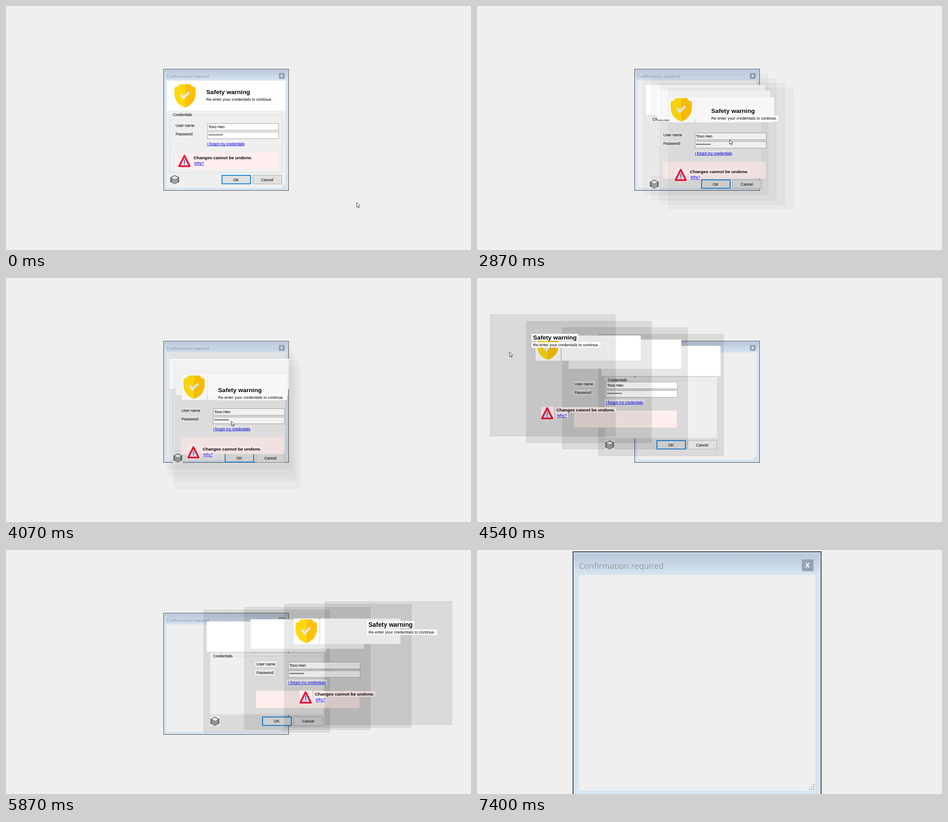
An HTML page with a canvas that plays this animation: 1031 px wide and 543 px high, repeating every 7.74 s.

```html
<!DOCTYPE html>
<html lang="en">
<head>
<meta charset="utf-8">
<title>Layered dialog</title>
<style>
html, body { margin: 0; width: 100%; height: 100%; overflow: hidden; background: #efefef; }
canvas { display: block; }
</style>
</head>
<body>
<canvas width="1031" height="543"></canvas>
<script>
const ctx = document.querySelector('canvas').getContext('2d');
const LOOP = 7740;
const WIN = { x: 349, y: 140, w: 278, h: 271 };
const GRAY = '#efefef', PINK = '#ffeeed', LINK = '#0000ee';
const MAX_INFLATE = 256;

// Layer spread at a few moments: time, x, y
const SPREAD = [
  [0, 0, 0], [1270, 0, 0], [2680, 1, 0.6], [2870, 18.6, 10.4],
  [3470, 103, 31.5], [3680, 103, 31.5], [4450, -87, -2], [4540, -80.2, -14.7],
  [4740, -40, -32.5], [5270, 90, -9.5], [5470, 90, -6], [6670, 90, -6], [7400, -12, 0],
];

const mix = (a, b, u) => a + (b - a) * u;
const progress = (t, from, to) => Math.min(1, Math.max(0, (t - from) / (to - from)));

function spreadAt(t) {
  const i = SPREAD.findIndex(p => p[0] > t);
  if (i < 0) return SPREAD[SPREAD.length - 1].slice(1);
  const [t0, x0, y0] = SPREAD[i - 1], [t1, x1, y1] = SPREAD[i];
  const u = progress(t, t0, t1);
  return [mix(x0, x1, u), mix(y0, y1, u)];
}

function box(x, y, w, h, fill, line, width = 1) {
  ctx.fillStyle = fill;
  ctx.fillRect(x, y, w, h);
  if (!line) return;
  ctx.strokeStyle = line;
  ctx.lineWidth = width;
  ctx.strokeRect(x + width / 2, y + width / 2, w - width, h - width);
}

function shape(points, fill, line, width = 1, closed = true) {
  ctx.beginPath();
  points.forEach(([x, y]) => ctx.lineTo(x, y));
  if (closed) ctx.closePath();
  if (fill) { ctx.fillStyle = fill; ctx.fill(); }
  if (line) { ctx.strokeStyle = line; ctx.lineWidth = width; ctx.stroke(); }
}

// Text on an optional plate that is a little wider than the words
function text(s, x, y, { font = '9px "Liberation Sans"', color = '#000', gap = -0.25, plate, rise = 9.5, pad = 2.5 } = {}) {
  ctx.font = font + ', sans-serif';
  ctx.letterSpacing = gap + 'px';
  const w = ctx.measureText(s).width;
  if (plate) box(x - pad, y - rise, w + 2 * pad, rise + 2.7, plate);
  ctx.fillStyle = color;
  ctx.fillText(s, x, y);
  if (color === LINK) ctx.fillRect(x, y + 1, w, 0.9);
}

function button(s, x, line, width) {
  box(x, 376, 65, 20.5, '#e1e1e1', line, width);
  ctx.textAlign = 'center';
  text(s, x + 32, 389.6);
  ctx.textAlign = 'left';
}

function drawFrame() {
  box(349, 140, 278, 271, '#d7e4f2', '#3f4348');
  const bar = ctx.createLinearGradient(0, 142, 0, 166);
  bar.addColorStop(0, '#b9c9da');
  bar.addColorStop(1, '#d7e4f2');
  box(351, 142, 274, 24, bar);
  box(356, 166, 264, 239, GRAY);
  text('Confirmation required', 356, 159.5, { font: '9.1px "Open Sans"', color: '#92979c', gap: 0 });
  box(605, 149, 13, 13, '#97a3b1');
  text('x', 608.8, 158, { font: 'bold 8.5px "Open Sans"', color: '#fff', gap: 0 });
  for (let i = 0; i < 3; i++)
    for (let j = 2 - i; j < 3; j++) box(612.5 + 2.5 * i, 397.5 + 2.5 * j, 1.5, 1.5, '#bcbcbc');
}

function drawStack() {
  box(363, 376, 22, 21, GRAY);
  for (let y = 391; y >= 382; y -= 3)
    shape([[374, y - 4.7], [383.4, y], [374, y + 4.7], [364.6, y]], GRAY, '#222', 1.1);
}

function drawPanels() {
  box(356, 166, 264, 67, '#fff');
  box(363, 236, 250, 136, GRAY);
  box(363, 242, 250, 129, GRAY, '#dcdcdc');
  text('Credentials', 370, 245.3, { plate: GRAY });
  drawStack();
  button('OK', 478, '#0078d7', 1.8);
  button('Cancel', 547, '#adadad');
}

function drawFields() {
  box(363, 167, 250, 65, '#fff');
  const rows = [['User name', 'Tovo Hen'], ['Password', '*'.repeat(10)]];
  rows.forEach(([label, value], i) => {
    const y = 261 + 19 * i;
    text(label, 376, y + 8.3, { plate: GRAY });
    box(446, y, 159, 16, '#fff', '#a2a2a2');
    text(value, 448.5, y + 11);
  });
  text('I forgot my credentials', 446, 309.7, { color: LINK, plate: GRAY });
  box(375, 325, 228, 38, PINK);
}

function drawShield() {
  box(370, 172, 55, 56, '#fff');
  [[-1, '#ffd90c'], [1, '#fdc003']].forEach(([side, color]) => {
    const x = d => 397 + side * d;
    ctx.beginPath();
    ctx.moveTo(397, 174);
    ctx.lineTo(x(13), 174);
    ctx.quadraticCurveTo(x(15), 181, x(23), 181);
    ctx.bezierCurveTo(x(25), 198, x(24), 218, 397, 226);
    ctx.fillStyle = color;
    ctx.fill();
  });
  shape([[388, 196.5], [393.6, 204.5], [406, 191.7]], null, '#e9e9e9', 5, false);
}

function drawWarning() {
  box(382, 330, 28, 30, PINK);
  ctx.lineJoin = 'round';
  shape([[395.6, 333.3], [407.3, 356.6], [383.9, 356.6]], '#dad9f2', '#ea1030', 3.7);
  ctx.lineJoin = 'miter';
  box(394.9, 342, 1.5, 8, '#3b3566');
  box(394.9, 351.5, 1.5, 1.8, '#3b3566');
  text('Changes cannot be undone.', 416, 340.8, { font: 'bold 9.7px "Liberation Sans"', gap: 0, plate: PINK });
  text('Why?', 417, 353.3, { color: LINK, plate: PINK });
}

function drawIcons() {
  drawShield();
  box(428, 172, 175, 56, '#fff');
  drawWarning();
}

function drawHeading() {
  text('Safety warning', 444.3, 196.2, { font: 'bold 13.6px "Liberation Sans"', gap: 0, plate: '#fff', rise: 13, pad: 3.5 });
  text('Re-enter your credentials to continue.', 444.3, 211.3, { font: '8.75px "Liberation Sans"', gap: 0, plate: '#fff', pad: 3.5 });
}

const LAYERS = [drawFrame, drawPanels, drawFields, drawIcons, drawHeading];

function drawCursor(x, y) {
  const arrow = [[0, 0], [0, 10.2], [2.4, 8], [4, 12], [5.6, 11.3], [4, 7.5], [7.2, 7.3]];
  shape(arrow.map(([px, py]) => [x + px + 0.5, y + py + 0.5]), '#fff', '#222', 0.9);
}

function draw(t) {
  const [dx, dy] = spreadAt(t);
  const s = Math.max(0, Math.min(t, 7400) - 5860) / 1000;
  const zoom = 37.7 * s + 33.5 * s * s;
  const shade = Math.abs(dx) / 1200 + Math.abs(dy) / 630 + Math.min(zoom / 1300, 0.04);
  box(0, 0, 1031, 543, GRAY);

  LAYERS.forEach((paint, k) => {
    const grow = Math.floor(zoom * (k + 1) + 0.4);
    if (grow > MAX_INFLATE) return;
    ctx.save();
    ctx.translate(WIN.x - grow + Math.round(k * dx), WIN.y - grow + Math.round(k * dy));
    ctx.scale(1 + 2 * grow / WIN.w, 1 + 2 * grow / WIN.h);
    ctx.translate(-WIN.x, -WIN.y);
    if (k) box(WIN.x, WIN.y, WIN.w, WIN.h, `rgba(0,0,0,${shade})`, `rgba(0,0,0,${shade * 0.6})`);
    paint();
    ctx.restore();
  });

  // The pointer steers the spread, after coming in from below
  const away = 1 - progress(t, 540, 870);
  if (t < 200) drawCursor(777, 437);
  else if (t >= 540 && t < 5340) drawCursor(467 + 4.94 * dx + 130 * away, 242 + 5.25 * dy + 230 * away);
}

function tick() {
  draw(performance.now() % LOOP);
  requestAnimationFrame(tick);
}
tick();
</script>
</body>
</html>
```
